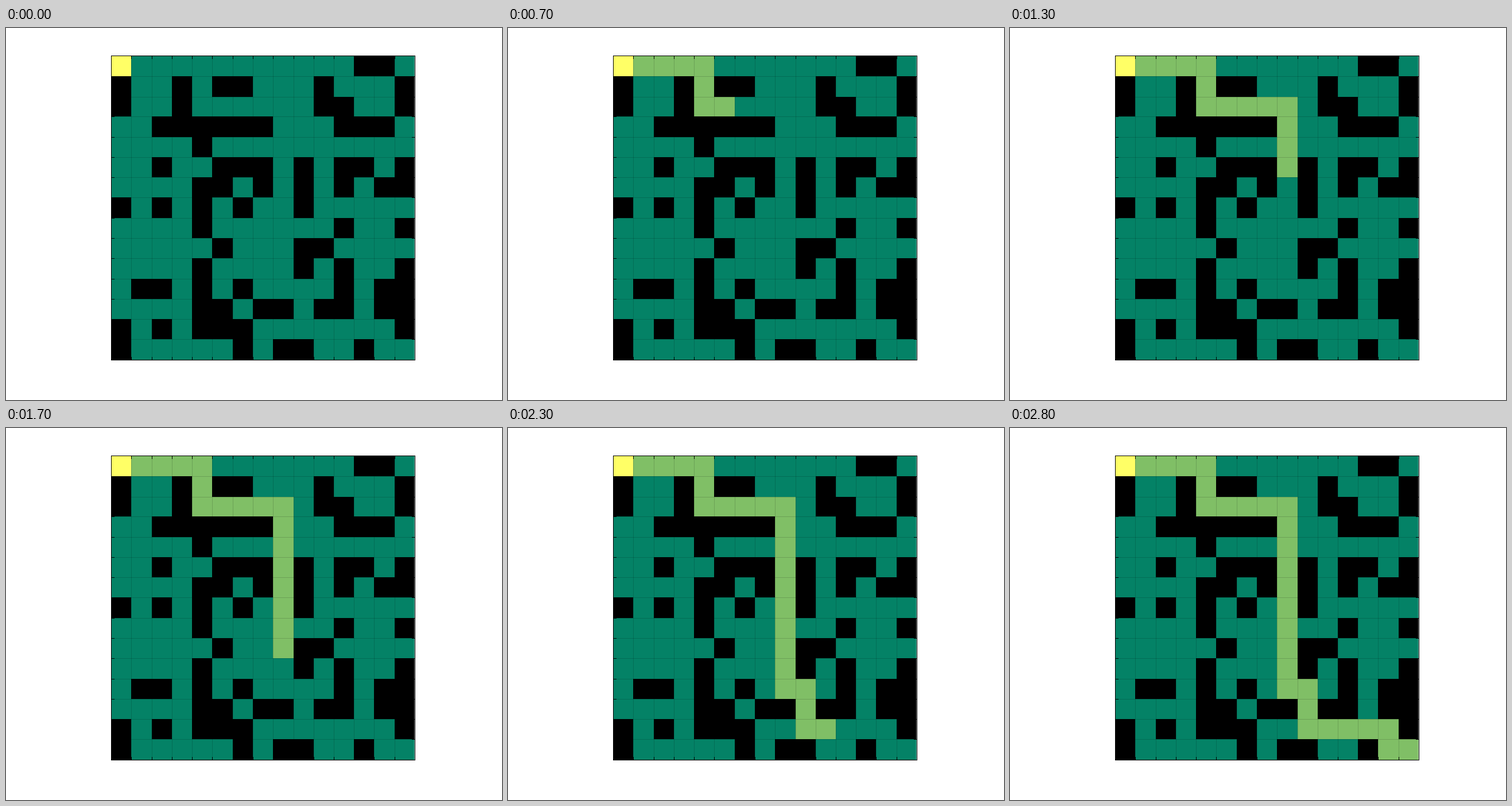
A matplotlib script that plays this animation: 864 px wide and 648 px high, repeating every 2.9 s.

```python
import matplotlib.pyplot as plt
from matplotlib.animation import FuncAnimation
from matplotlib.patches import Rectangle

W, H, DPI = 864, 648, 100
STEP_MS = 100

FLOOR = "#048266"
WALL = "#000000"
START = "#ffff66"
TRAIL = "#80bf66"

MAZE = [
    "............##.",
    "#..#.##...#...#",
    "#..#......##..#",
    "..######...###.",
    "....#..........",
    "..#..###.#.##.#",
    "....##.#.#.#.##",
    "#.#.#.#..#.....",
    "....#......#..#",
    ".....#...##....",
    "....#....#.#..#",
    ".##.#.#....#.##",
    "....##.##.##.##",
    "#.#.###.......#",
    "#.....#.##..#..",
]
MOVES = "RRRR" "DD" "RRRR" "DDDDDDDDD" "R" "DD" "RRRR" "D" "R"

# Pixel edges of the columns and rows
XS = [184, 218, 254, 289, 324, 359, 395, 430, 465, 501, 536, 571, 606, 641, 677, 712]
YS = [49, 84, 120, 154, 190, 225, 260, 295, 331, 366, 401, 437, 472, 507, 542, 578]
LEFT, TOP, RIGHT, BOTTOM = XS[0] - 1, YS[0] - 1, XS[-1], YS[-1]
TICK = 5

fig = plt.figure(figsize=(W / DPI, H / DPI), dpi=DPI, facecolor="white")
ax = fig.add_axes([0, 0, 1, 1])
ax.set_xlim(0, W)
ax.set_ylim(H, 0)
ax.axis("off")


def box(x0, y0, x1, y1, color, z=1, alpha=1):
    patch = Rectangle((x0, y0), x1 - x0, y1 - y0, facecolor=color,
                      linewidth=0, alpha=alpha, zorder=z)
    return ax.add_patch(patch)


def cell(row, col, color):
    return box(XS[col], YS[row], XS[col + 1], YS[row + 1], color)


def trace(moves):
    row = col = 0
    for move in moves:
        row += move == "D"
        col += move == "R"
        yield row, col


cells = {(r, c): cell(r, c, WALL if mark == "#" else FLOOR)
         for r, line in enumerate(MAZE) for c, mark in enumerate(line)}
cells[0, 0].set_facecolor(START)
path = list(trace(MOVES))

# Faint grid with ticks on all four sides
for x in XS[1:-1]:
    box(x, YS[0], x + 1, YS[-1], "black", 2, 0.15)
    box(x, TOP, x + 1, TOP + TICK + 1, "black", 4)
    box(x, BOTTOM - TICK, x + 1, BOTTOM, "black", 4)
for y in YS[1:-1]:
    box(XS[0], y, XS[-1], y + 1, "black", 2, 0.15)
    box(LEFT, y, LEFT + TICK + 1, y + 1, "black", 4)
    box(RIGHT - TICK, y, RIGHT, y + 1, "black", 4)

# Light seam inside the right border, then the frame
box(RIGHT - 1, YS[0], RIGHT, YS[-1], "white", 3, 0.5)
box(LEFT, TOP, RIGHT + 1, TOP + 1, "black", 5)
box(LEFT, BOTTOM, RIGHT + 1, BOTTOM + 1, "black", 5)
box(LEFT, TOP, LEFT + 1, BOTTOM + 1, "black", 5)
box(RIGHT, TOP, RIGHT + 1, BOTTOM + 1, "black", 5)


def update(step):
    for i, pos in enumerate(path):
        cells[pos].set_facecolor(TRAIL if i < step else FLOOR)
    return [cells[pos] for pos in path]


anim = FuncAnimation(fig, update, frames=len(path) + 1, interval=STEP_MS,
                     repeat=True, repeat_delay=0, blit=False)
plt.show()
```
